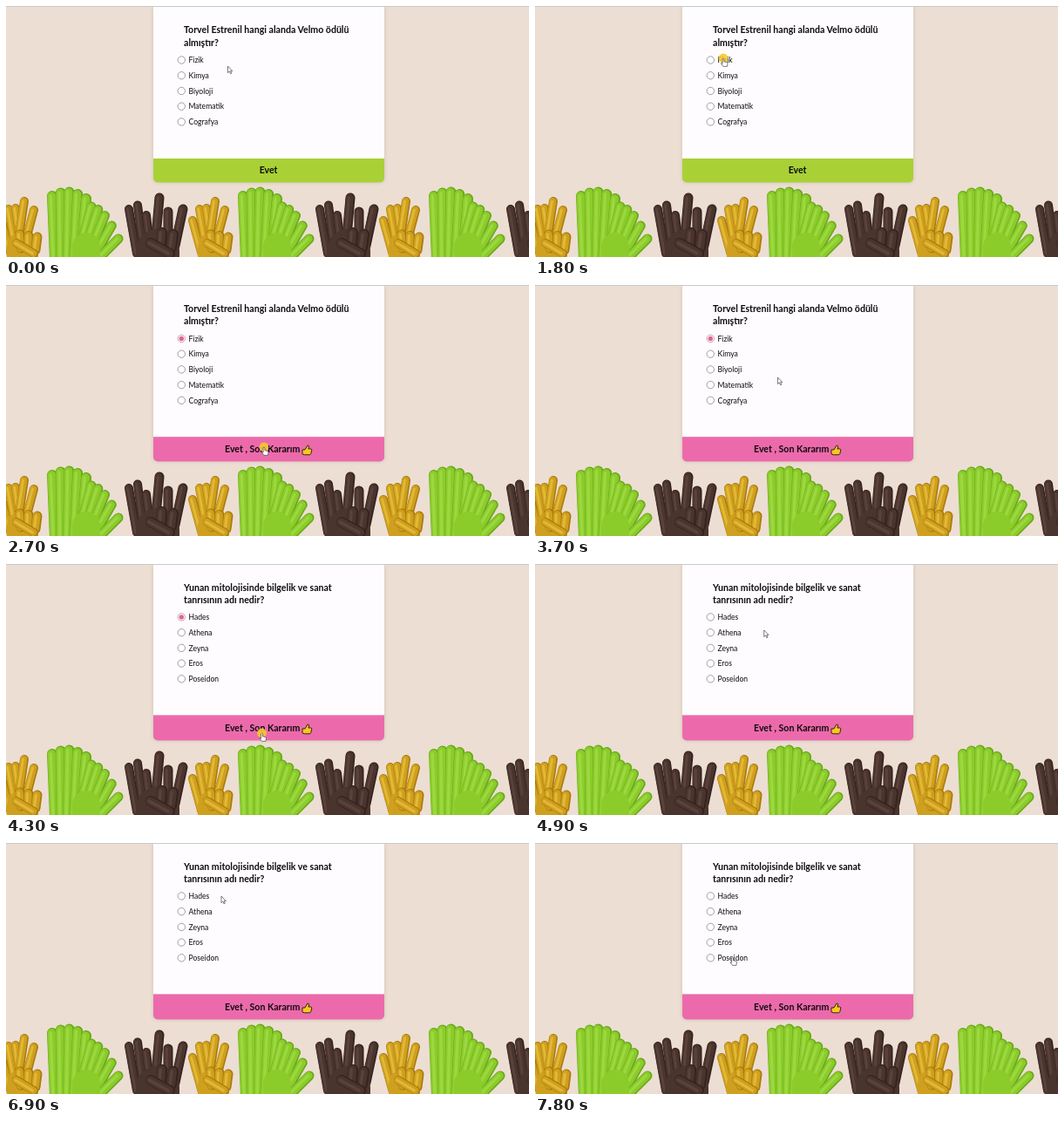
An HTML page for the animation above (8000 ms loop, 600 by 288 pixels).

```html
<!DOCTYPE html>
<html lang="tr">
<head>
<meta charset="utf-8">
<title>Quiz</title>
<style>
  html, body { margin: 0; width: 100%; height: 100%; overflow: hidden; background: #ecded2; }
  svg { display: block; width: 600px; height: 288px; }
  text { font: 8.6px Lato, sans-serif; fill: #0e0c0e; }
  .bold { font-size: 10.6px; font-weight: 700; }
  #shadow { filter: drop-shadow(0 0 2px #0002); }
  #strip { fill: none; stroke-linecap: round; filter: blur(.4px); }
</style>
</head>
<body>
<svg viewBox="0 0 600 288">
  <rect width="600" height="288" fill="#ecded2"/>
  <defs><g id="hands"></g></defs>
  <g id="strip">
    <use href="#hands"/><use href="#hands" x="219"/><use href="#hands" x="438"/>
  </g>
  <g id="shadow">
    <rect id="button" x="169" y="150" width="265" height="52.5" rx="5"/>
    <rect id="card" x="169" width="265" fill="#fefcfe"/>
  </g>
  <rect width="600" height="1" fill="#c5cacb"/>
  <text id="line0" class="bold" x="204" y="31"/>
  <text id="line1" class="bold" x="204"/>
  <g id="options"></g>
  <text id="label" class="bold" y="192.2"/>
  <path id="thumb" d="M1 6h3l3-5q2 0 1.5 2l-.6 2h3q1.4.6.8 2l-1 3.8q-.4 1-1.6 1H3.5L1 11z"
        fill="#f9c623" stroke="#33270f" transform="translate(339 183)"/>
  <g id="cursor" fill="#fff" stroke="#444" stroke-width=".7" stroke-linejoin="round">
    <circle id="click" r="5.4" fill="#f5c92c" fill-opacity=".9" stroke="none"/>
    <path id="arrow" d="M0 0v7.6l1.8-1.6 1.3 2.8 1.2-.6-1.2-2.7h2.2z"/>
    <path id="pointer" d="M-.9.8q.9-1.6 1.8 0v3l3 .6q1.3.4 1.1 1.8l-.6 3.2h-4.4l-2.6-3.4q-.2-1.2 1.7.2z"/>
  </g>
</svg>
<script>
const $ = id => document.getElementById(id);
const set = (el, attrs) => { for (const k in attrs) el.setAttribute(k, attrs[k]); return el; };
const add = (parent, tag, attrs) =>
  parent.appendChild(set(document.createElementNS('http://www.w3.org/2000/svg', tag), attrs));
const mix = (a, b, p) => a + (b - a) * p;

// A clay finger: dark rim, body, soft highlight
function finger([dark, mid, light], width, [x1, y1], [x2, y2]) {
  [[dark, 1, 0], [mid, .8, -.06], [light, .28, -.15]].forEach(([stroke, scale, shift]) => {
    const dx = shift * width;
    add($('hands'), 'path', {
      d: `M${x1 + dx} ${y1}L${x2 + dx} ${y2}`, stroke, 'stroke-width': width * scale });
  });
}
// Fingers spread evenly from the first to the last; inner tips rise by `arch`
function fan(colors, count, width, tips, bases, arch = 0) {
  for (let i = 0; i < count; i++) {
    const p = i / (count - 1), at = ([a, b]) => a.map((v, k) => mix(v, b[k], p));
    const [x, y] = at(tips);
    finger(colors, width, [x, y - arch * Math.sin(Math.PI * p)], at(bases));
  }
}
function palm(color, x, width) {
  add($('hands'), 'path', { d: `M${x} ${268 + width / 4}V300`, stroke: color, 'stroke-width': width });
}

const yellow = ['#a97a0e', '#cfa01f', '#e2b935'];
fan(yellow, 3, 10, [[-5, 246], [11, 232]], [[6, 286], [17, 272]], 6);
finger(yellow, 10, [32, 234], [23, 268]);
finger(yellow, 10, [21, 224], [14, 270]);
palm(yellow[1], 19, 36);
fan(yellow, 3, 11, [[16, 262], [36, 265]], [[17, 278], [34, 280]]);
finger(yellow, 10, [12, 272], [32, 284]);

const green = ['#68a81c', '#8ccc2a', '#9cd840'];
palm(green[1], 68, 36);
fan(green, 5, 12, [[53, 218], [92, 221]], [[56, 290], [86, 288]], 6);
fan(green, 5, 11, [[98, 230], [129, 267]], [[84, 282], [106, 290]], 8);
palm(green[1], 92, 32);

const brown = ['#35231f', '#4a342e', '#5a423b'];
fan(brown, 3, 10, [[141, 233], [161, 240]], [[150, 284], [166, 280]], 8);
finger(brown, 11, [203, 233], [194, 275]);
fan(brown, 2, 11, [[176, 220], [186, 236]], [[171, 276], [186, 276]]);
palm(brown[1], 174, 50);
fan(brown, 2, 12, [[179, 260], [192, 262]], [[178, 274], [190, 277]]);
finger(brown, 12, [166, 272], [188, 284]);

const radios = Array.from({ length: 5 }, () => ({
  ring: add($('options'), 'circle', { cx: 201.3, r: 4.2, fill: '#fff', 'stroke-width': .8 }),
  dot: add($('options'), 'circle', { cx: 201.3, r: 2.7, fill: '#e4638f' }),
  name: add($('options'), 'text', { x: 209.5 })
}));

const first = {
  lines: ['Torvel Estrenil hangi alanda Velmo ödülü', 'almıştır?'],
  names: ['Fizik', 'Kimya', 'Biyoloji', 'Matematik', 'Cografya']
};
const second = {
  lines: ['Yunan mitolojisinde bilgelik ve sanat', 'tanrısının adı nedir?'],
  names: ['Hades', 'Athena', 'Zeyna', 'Eros', 'Poseidon']
};

const clicks = [1800, 2700, 4200];
// Cursor moves: start, end, target
const moves = [
  [0, 800, [216, 60]],
  [1800, 2500, [296, 186]],
  [2700, 3400, [278.5, 106]],
  [3700, 4000, [293.5, 194]],
  [4300, 5100, [257, 54]],
  [6000, 6800, [247, 61]],
  [6900, 7700, [226.5, 131]]
];

function cursorAt(t) {
  return moves.reduce((pos, [start, end, target]) => {
    const p = Math.min(1, Math.max(0, (t - start) / (end - start)));
    return pos.map((v, k) => mix(v, target[k], p * p * (3 - 2 * p)));
  }, [254.5, 69]);
}

function render(t) {
  const [, confirm, next] = clicks;
  const confirmed = t >= confirm, selected = t >= 1900 && t < 4500;
  const quiz = t < next ? first : second;
  // The layout creeps up a little with each step
  const step = confirmed + (t >= next), buttonTop = 175 - .8 * step;

  set($('button'), { fill: confirmed ? '#ec6aab' : '#a9d136' });
  set($('card'), { height: buttonTop });
  set($('line1'), { y: 46 - .6 * step });
  quiz.lines.forEach((line, i) => { $('line' + i).textContent = line; });
  radios.forEach(({ ring, dot, name }, i) => {
    const y = 62 - .55 * step + i * 17.73, on = selected && i === 0;
    set(ring, { cy: y, stroke: on ? '#b98a98' : '#888' });
    set(dot, { cy: y, opacity: +on });
    set(name, { y: y + 3.2 }).textContent = quiz.names[i];
  });
  set($('label'), { x: confirmed ? 251 : 290.7 })
    .textContent = confirmed ? 'Evet , Son Kararım' : 'Evet';
  set($('thumb'), { opacity: +confirmed });

  const [x, y] = cursorAt(t);
  const overLink = x < 240 || (y > buttonTop && y < 202);
  set($('cursor'), { transform: `translate(${x} ${y})` });
  set($('arrow'), { opacity: +!overLink });
  set($('pointer'), { opacity: +overLink });
  set($('click'), { opacity: +clicks.some(c => t >= c && t < c + 200) });
}

const start = performance.now();
function tick() {
  const t = (performance.now() - start) % 8000;
  render(Math.floor(t / 100) * 100);
  requestAnimationFrame(tick);
}
tick();
</script>
</body>
</html>
```
